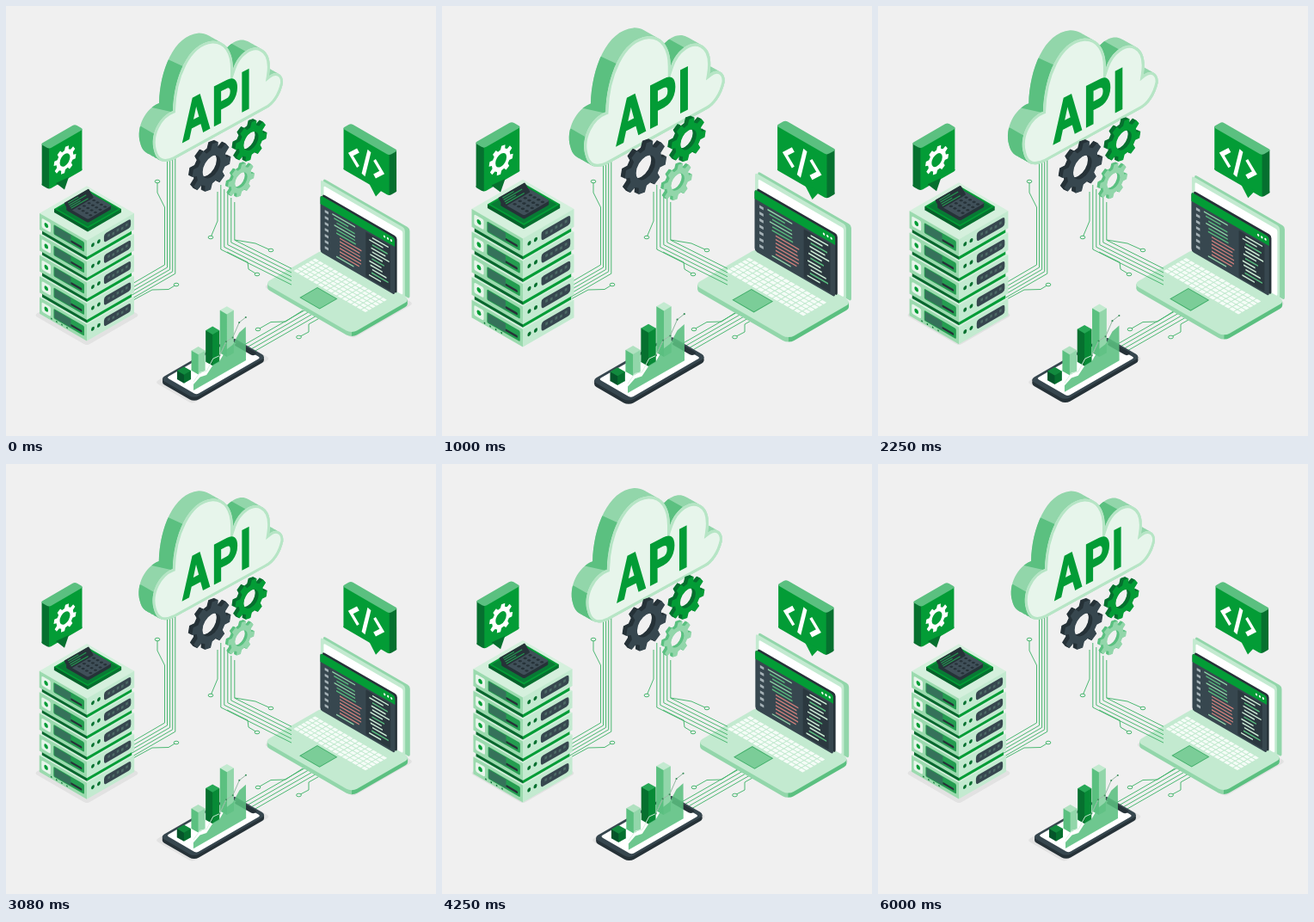
Animation, 500 px wide and 500 px high, one loop 6.04 s. Source, as an HTML page with a canvas:

```html
<!DOCTYPE html>
<html lang="en">
<head>
<meta charset="utf-8">
<title>API network</title>
<style>
html, body { margin: 0; width: 100%; height: 100%; overflow: hidden; background: #f0f0f0; }
canvas { display: block; width: 500px; height: 500px; }
</style>
</head>
<body>
<canvas id="stage"></canvas>
<script>
const canvas = document.getElementById('stage');
const ctx = canvas.getContext('2d');
const dpr = window.devicePixelRatio || 1;
canvas.width = canvas.height = 500 * dpr;

const LOOP = 6040, GROW = 0.085, K = Math.cos(Math.PI / 6);
const TOP = [K, 0.5, -K, 0.5], LEFT = [K, 0.5, 0, 1], RIGHT = [K, -0.5, 0, 1];
const SLATE = '#37474f', INK = '#263238', WIRE = '#43b56b';
const GREEN = '#039c36', DEEP = '#06702f', MID = '#5bc080', SOFT = '#92d6aa', PALE = '#c3ead0', MINT = '#e7f5eb';

// [time, size] turning points of the pulse
const beats = [[0, 0], [1150, 1], [3400, 0], [3620, 0], [4800, 1], [6010, 0], [LOOP, 0]];

function pulse(t) {
  const i = beats.findIndex(b => b[0] > t);
  const [t0, a] = beats[i - 1], [t1, b] = beats[i];
  return a + (b - a) * (1 - Math.cos(Math.PI * (t - t0) / (t1 - t0))) / 2;
}

function random(seed) {
  return () => (seed = seed * 16807 % 2147483647) / 2147483647;
}

function repeat(n, draw) {
  for (let i = 0; i < n; i++) draw(i);
}

function poly(pts, fill) {
  ctx.beginPath();
  pts.forEach(p => ctx.lineTo(p[0], p[1]));
  ctx.fillStyle = fill;
  ctx.fill();
}

function line(pts, color, width = 1) {
  ctx.beginPath();
  pts.forEach(p => ctx.lineTo(p[0], p[1]));
  ctx.strokeStyle = color;
  ctx.lineWidth = width;
  ctx.stroke();
}

function rect(x, y, w, h, fill, r = 0) {
  ctx.beginPath();
  ctx.roundRect(x, y, w, h, r);
  ctx.fillStyle = fill;
  ctx.fill();
}

function dot(x, y, r, fill) {
  ctx.beginPath();
  ctx.arc(x, y, r, 0, 7);
  ctx.fillStyle = fill;
  ctx.fill();
}

// draw in a slanted plane with its origin at x, y
function plane(x, y, m, draw) {
  ctx.save();
  ctx.transform(...m, x, y);
  draw();
  ctx.restore();
}

function group(cx, cy, s, draw) {
  plane(cx - cx * s, cy - cy * s, [s, 0, 0, s], draw);
}

// isometric block: back corner x, y; a runs right-down, b left-down, h down
function slab(x, y, a, b, h, [top, left, right], r = 0) {
  const front = x + K * (a - b), cut = r * 0.507;
  const x0 = x - K * b + cut, x1 = x + K * a - cut, y0 = y + b / 2, y1 = y + a / 2;
  const side = ctx.createLinearGradient(front - 0.4, 0, front + 0.4, 0);
  side.addColorStop(0, left);
  side.addColorStop(1, right);
  poly([[x0, y0], [x1, y1], [x1, y1 + h], [x0, y0 + h]], side);
  for (const [dy, fill] of [[h, side], [0, top]]) {
    ctx.beginPath();
    plane(x, y + dy, TOP, () => ctx.roundRect(0, 0, a, b, r));
    ctx.fillStyle = fill;
    ctx.fill();
  }
}

function gear(x, y, r, depth, front, side) {
  const path = new Path2D(), n = 8, hole = r * 0.46;
  repeat(n, i => {
    for (const [k, size] of [[-0.32, 0.76], [-0.2, 1], [0.2, 1], [0.32, 0.76]]) {
      const a = (i + k + 0.25) * Math.PI * 2 / n;
      path.lineTo(Math.cos(a) * r * size, Math.sin(a) * r * size);
    }
  });
  path.closePath();
  path.moveTo(hole, 0);
  path.arc(0, 0, hole, 0, Math.PI * 2);
  for (let d = depth; d >= 0; d -= 0.5) {
    plane(x - d, y - d / 2, RIGHT, () => {
      ctx.fillStyle = d ? side : front;
      ctx.fill(path, 'evenodd');
    });
  }
}

function shadow(x, y, a, b) {
  plane(x, y, TOP, () => rect(0, 0, a, b, '#e2e2e2', 4));
}

function wire(...pts) { line(pts, WIRE, 0.95); }

// wire that ends in a small ring
function branch(...pts) {
  const [x, y] = pts[pts.length - 1];
  wire(...pts);
  ctx.beginPath();
  ctx.ellipse(x, y, 2.9, 1.8, 0, 0, 7);
  ctx.fillStyle = '#f0f0f0';
  ctx.fill();
  ctx.stroke();
}

function serverWires() {
  repeat(4, i => {
    const x = 187.5 + i * 3.1, y = 304 + i * 2.4;
    wire([x, 170], [x, y], [140, y + (x - 140) * 0.577]);
  });
  branch([140, 327], [184.5, 301], [184.5, 234], [176, 217], [176, 204]);
  branch([146, 343], [170, 330], [189, 329.5], [198, 324]);
}

function phoneWires() {
  repeat(4, i => {
    const x = 270 + i * 4, y = 398 + i * 2.5;
    wire([x, y], [x + 82, y - 47]);
  });
  branch([345, 354], [325, 367], [308, 367.5], [293, 376]);
  branch([368, 361], [352, 370], [352, 379], [340.5, 385]);
}

function laptopWires() {
  repeat(5, i => {
    const x = 249.8 + i * 4, y = 283 - i * 2.7;
    wire([x, 208 + i * 5], [x, y], [332, y + (332 - x) / 2]);
  });
  branch([246, 216], [246, 250], [238, 269]);
  branch([266, 272], [290, 276], [308, 284]);
  branch([257, 286], [281, 298], [282, 306], [292, 312]);
}

const cloud = new Path2D('M172 168C167 150 178 128 194 122C195 84 211 43 240 40.5C256 40 264 54 264 73' +
  'C270 55 286 44 297 50C307 55 308 68 306 81C315 74 323 80 322 90C319 104 311 115 303 119' +
  'L196 178C184 184 175 181 172 168Z');
const bulk = new Path2D();
repeat(33, i => bulk.addPath(cloud, new DOMMatrix([1, 0, 0, 1, -i / 2, -i * 0.28])));

function drawCloud() {
  ctx.fillStyle = SOFT;
  ctx.fill(bulk);
  ctx.save();
  ctx.clip(bulk);
  poly([[165, 117], [170, 70], [186, 61], [210, 72], [206, 126], [192, 123]], MID);
  poly([[150, 141], [157, 140], [178, 152], [182, 190], [150, 188]], MID);
  poly([[254, 50], [261, 43], [279, 53], [268, 80], [258, 72]], MID);
  ctx.restore();

  ctx.save();
  ctx.clip(cloud);
  ctx.fillStyle = MINT;
  ctx.fill(cloud);
  ctx.strokeStyle = '#b6e5c5';
  ctx.lineWidth = 6;
  ctx.stroke(cloud);
  ctx.restore();

  plane(205, 158, [0.7, -0.36, 0, 1], () => {
    ctx.font = 'bold 64px "Liberation Sans", Arial, sans-serif';
    ctx.letterSpacing = '3.5px';
    ctx.lineJoin = 'miter';
    ctx.lineWidth = 2.6;
    ctx.fillStyle = ctx.strokeStyle = GREEN;
    ctx.fillText('API', 0, 0);
    ctx.strokeText('API', 0, 0);
  });
}

function gears() {
  gear(239, 187, 26, 4.5, SLATE, INK);
  gear(285, 157, 21.5, 4, GREEN, DEEP);
  gear(273.5, 202.5, 18, 3, SOFT, MID);
}

function gearBubble() {
  slab(80, 137.5, 11.5, 46, 47, [MID, DEEP, GREEN], 3);
  poly([[58, 206], [73, 199], [68, 213.5]], DEEP);
  gear(68.5, 179, 15, 0, '#fff');
}

function codeBubble() {
  slab(401, 136.5, 63, 11.5, 47, [MID, GREEN, DEEP], 3);
  poly([[421, 204], [438, 213], [430, 221.5]], GREEN);
  plane(419, 182.5, LEFT, () => {
    ctx.lineJoin = 'miter';
    for (const side of [-1, 1]) line([[side * 11, -9], [side * 21, 0.5], [side * 11, 10]], '#fff', 4.6);
    line([[4, -16], [-4, 16]], '#fff', 4.6);
  });
}

function serverUnit(i) {
  const w = 63.5, y = 209.3 + i * 24.4;
  slab(94, y, w, w, 19, ['#d5f0dd', '#9bdaae', PALE]);
  plane(94 - K * w, y + w / 2, LEFT, () => {
    rect(3, 4, 12, 11, MINT, 2);
    dot(9, 9.5, 2.6, GREEN);
    rect(19, 3.5, 41, 11.5, '#249d50', 1.5);
    rect(20, 4.5, 22, 9.5, '#35725a');
    rect(42, 10, 15, 2.6, INK, 1);
    if (i === 4) repeat(4, k => dot(16 + k * 7, 17, 0.9, DEEP));
  });
  plane(94, y + w, RIGHT, () => {
    dot(8, 9, 2.2, DEEP);
    dot(16, 9, 2.2, DEEP);
    rect(23, 4, 36, 10, SLATE, 3);
    repeat(5, k => rect(28 + k * 6, 7 + k % 2, 3, 3, '#4d6b66'));
  });
  if (i) slab(94, y - 4, 60, 60, 5.5, [DEEP, '#08682e', GREEN]);
}

function calculator() {
  slab(97, 217, 30, 32, 4, ['#405059', INK, INK], 2);
  plane(97, 217, TOP, () => {
    repeat(16, k => dot(12 + k % 4 * 5, 6 + (k >> 2) * 6.5, 1.7, INK));
  });
  plane(67.5, 229, [K, -0.5, 0.45, 0.8], () => {
    rect(0, 0, 33, 13, INK, 1);
    repeat(4, k => rect(4, 2 + k * 2.6, 14 + k % 2 * 9, 1.2, '#239b50'));
  });
}

function server() {
  for (let i = 4; i >= 0; i--) serverUnit(i);
  slab(95, 213.5, 45, 45, 4, [GREEN, '#06602a', DEEP]);
  plane(95, 215.5, TOP, () => rect(0, 0, 41, 41, '#087a34'));
  calculator();
}

function codeWindow() {
  const rnd = random(7), w = 100, h = 66;
  plane(368, 218.5, LEFT, () => rect(0, 0, w, h, INK, 3));
  plane(365.5, 220, LEFT, () => {
    rect(0, 0, w, h, SLATE, 3);
    rect(0, 0, w, 10, GREEN, [3, 3, 0, 0]);
    rect(61, 12, 33, 52, '#2b383f', 1);
    repeat(3, k => dot(86 + k * 4.6, 5, 1.3, '#fff'));
    repeat(7, k => rect(6, 14 + k * 7, 5, 3, '#a4b1b6'));
    repeat(13, k => {
      const y = 13 + k * 3.9;
      if (k > 5 && k < 12) rect(26, y, 26 + rnd() * 4, 1.4, '#d3817d');
      else rect(16 + rnd() * 8, y, 16 + rnd() * 16, 1.4, k % 3 ? MID : SOFT);
    });
    repeat(12, k => rect(65 + rnd() * 5, 14 + k * 4.1, 13 + rnd() * 11, 1.6, k % 4 === 2 ? MID : '#cfeed8'));
  });
}

function laptop() {
  slab(369, 283, 117, 79, 5, [PALE, SOFT, MID], 7);
  plane(369, 283, TOP, () => {
    repeat(6, r => repeat(15, c => rect(5 + c * 6.5, 16 + r * 5, 5.4, 3.9, '#f5fcf7', 0.6)));
    rect(40, 48, 27, 24, '#3fae68');
    rect(41, 49, 25, 22, '#7bcd98');
  });

  plane(369, 200.5, LEFT, () => rect(0, 0, 116, 82, SOFT, 3));
  plane(366, 202, LEFT, () => {
    rect(0, 0, 113, 83, PALE, 3);
    rect(4, 5, 106, 74, '#fff', 2);
  });
  codeWindow();
}

const bars = [['#128a3e', '#05552a', DEEP], ['#b0e1c0', MID, SOFT], ['#27a856', DEEP, '#078a36'], [PALE, MID, SOFT]];

function phone() {
  slab(263, 385, 46, 97, 4, [SLATE, INK, INK], 6);
  plane(263, 385, TOP, () => {
    rect(3, 5, 40, 86, '#fff', 3);
    rect(10, 2, 26, 6, INK, 3);
  });

  for (let i = 3; i >= 0; i--) {
    const w = 9.3, h = 10 + i * 13.2;
    slab(207 + i * 16.6, 438.7 - i * 10.2 - w - h, w, w, h, bars[i]);
  }

  // rising zigzag from the low left to the high right
  const climb = (low, rise, zig) => Array.from({ length: 9 }, (_, i) =>
    [218 + i * 7.6, low - rise * (i / 8) ** 1.3 + (i % 2 ? -zig : zig)]);
  ctx.globalAlpha = 0.88;
  poly([...climb(438, 67, 2), [279, 412], [218, 447]], MID);
  ctx.globalAlpha = 1;
  const trend = climb(434, 75, 3);
  line(trend, '#d9f1e0', 0.9);
  line(trend.slice(4), '#57826a', 0.5);
  trend.slice(4).forEach(p => dot(...p, 1, '#3b8f5b'));
}

function draw(t) {
  const s = 1 + GROW * pulse(t);
  ctx.setTransform(dpr, 0, 0, dpr, 0, 0);
  ctx.fillStyle = '#f0f0f0';
  ctx.fillRect(0, 0, 500, 500);
  shadow(94, 324, 71, 71);
  shadow(370, 286, 120, 81);
  shadow(264, 385, 50, 105);
  serverWires();
  phoneWires();
  group(390, 304, s, laptop);
  laptopWires();
  group(240, 107, s, drawCloud);
  group(265, 176, s, gears);
  group(67, 176, s, gearBubble);
  group(94, 302, s, server);
  group(423, 180, s, codeBubble);
  group(242, 409, s, phone);
}

const start = performance.now();
function tick() {
  draw((performance.now() - start) % LOOP);
  requestAnimationFrame(tick);
}
tick();
</script>
</body>
</html>
```
